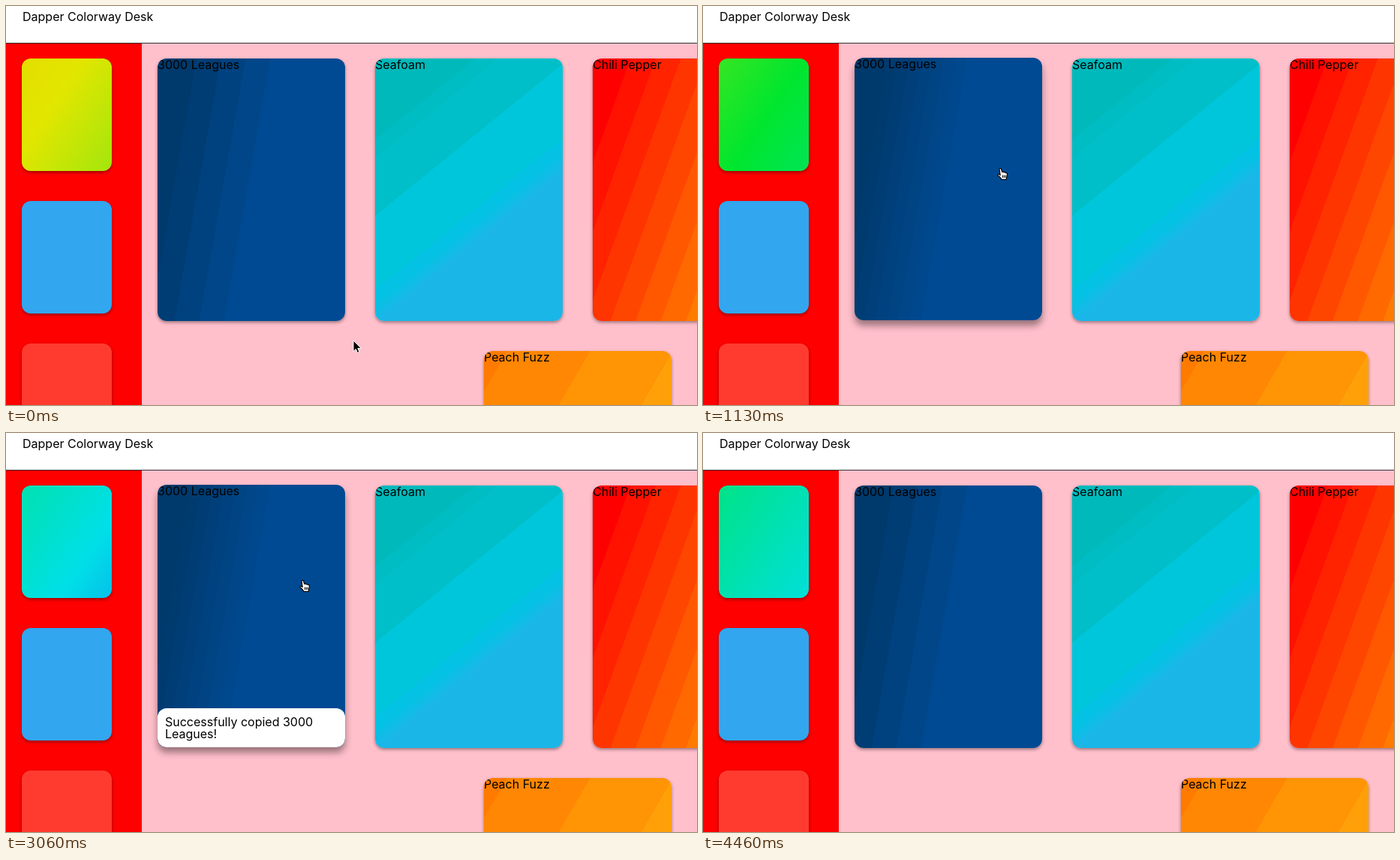
Animation of 921 by 532 pixels, one loop 4.56 s. Source, as an HTML page:

```html
<!DOCTYPE html>
<html lang="en">
<head>
<meta charset="utf-8">
<title>Dapper Colorway Desk</title>
<style>
  html, body { margin: 0; width: 100%; height: 100%; overflow: hidden; }
  body { position: relative; background: #ffbfcb; color: #000; font: 16px/1 Inter, sans-serif; }
  header { position: absolute; left: 0; top: 0; width: 100%; height: 49px; background: #fff; border-bottom: 1px solid #333; }
  header span { position: absolute; left: 22px; top: 6px; }
  aside { position: absolute; left: 0; top: 50px; width: 181px; bottom: 0; background: #f00; }
  .tile, .card { position: absolute; border-radius: 12px; box-shadow: 0 2px 4px rgba(0, 0, 0, .4); }
  .tile { left: 21px; width: 120px; height: 150px; }
  .card { width: 250px; height: 350px; overflow: hidden; }
  #rainbow {
    top: 20px;
    background: linear-gradient(124deg, #f00, #e90000, #ebb400, #e2e600, #00e62e, #00dfe8, #2a00ea, #dd00f5, #dd00f5);
    background-size: 1800% 1800%;
  }
  #toast {
    position: absolute; left: 0; bottom: 0; width: 230px; padding: 10px;
    background: #fff; border-radius: 12px;
  }
  svg { position: absolute; left: 0; top: 0; width: 20px; height: 20px; overflow: visible; }
</style>
</head>
<body>
<header><span>Dapper Colorway Desk</span></header>
<aside>
  <div class="tile" id="rainbow"></div>
  <div class="tile" style="top:210px;background:#32a6ee"></div>
  <div class="tile" style="top:400px;background:#ff3b30"></div>
</aside>
<main></main>
<svg id="arrow"><path d="M0 0V14.5L3.3 11.4L5.5 16.5L8 15.4L5.8 10.4H10.3Z" stroke="#fff"/></svg>
<svg id="hand"><g transform="translate(-4)" stroke="#000" stroke-linejoin="round">
  <path fill="#fff" stroke-width="1.2" d="M3 1.5C3.2 0 5.2 0 5.6 1.5L6.7 5.4C7.5 4.6 8.8 4.8 9.1 5.9C10 5.2 11.2 5.6 11.5 6.6C12.6 6.2 13.5 7 13.5 8.2L13 12L12 15.3H6L4.5 13L1.2 10C0 8.6 1.3 7.6 2.6 8.4L4.2 9.5Z"/>
  <path fill="none" d="M7.4 9.5v3.5M9.3 9.5v3.5M11.2 9.5v3.5"/>
</g></svg>
<script>
const LOOP = 4560;
const RAINBOW_SWEEP = 3950;
const HOVER_TIME = 400;
const byId = id => document.getElementById(id);
const clamp = v => Math.min(1, Math.max(0, v));
const mix = (a, b, k) => a + (b - a) * k;
const smooth = k => k * k * (3 - 2 * k);

// Stepped gradient: evenly spaced hard edges, colours blended between two ends.
function bands(angle, from, to, first, step, edges) {
  const stops = Array.from({ length: edges + 1 }, (_, i) => {
    const color = from.map((v, k) => Math.round(mix(v, to[k], i / edges)));
    return `rgb(${color}) 0 ${first + step * i}px`;
  });
  return `linear-gradient(${angle}deg, ${stops})`;
}

const navy = [0, 57, 107], blue = [0, 74, 147];
const red = [255, 0, 0], orange = [255, 123, 0], amber = [255, 160, 8];

// hover: times at which the pointer enters and leaves
const cards = [
  { name: '3000 Leagues', x: 202, y: 70, hover: [800, 3380],
    rest: bands(100, navy, blue, 51, 32.3, 4),
    active: bands(100, navy, blue, 43, 15, 8) },
  { name: 'Seafoam', x: 492, y: 70, hover: [3420, 3560],
    rest: `linear-gradient(141deg, #00b9bb 84px, #00bdc3 0 103px, #00bfc8 0 163px,
      #00c6db 0 240px, #04c2e3 0 254px, #1bb6e8 275px)` },
  { name: 'Chili Pepper', x: 782, y: 70,
    rest: bands(110, red, orange, 47.5, 31.5, 7) },
  { name: 'Peach Fuzz', x: 637, y: 460, hover: [3740, 3980],
    rest: bands(120, orange, amber, 27, 95.5, 3),
    active: bands(120, orange, amber, 27, 176, 2) },
];

for (const card of cards) {
  card.el = document.createElement('div');
  card.el.className = 'card';
  card.el.textContent = card.name;
  card.el.style.left = card.x + 'px';
  card.el.style.top = card.y + 'px';
  document.querySelector('main').append(card.el);
}
const toast = document.createElement('div');
toast.id = 'toast';
toast.textContent = 'Successfully copied 3000 Leagues!';
cards[0].el.append(toast);

// Where the pointer pauses or turns
const path = [
  { t: 240, x: 463, y: 446 },
  { t: 690, x: 449, y: 435 },
  { t: 950, x: 398, y: 286 },
  { t: 1210, x: 395, y: 196 },
  { t: 3230, x: 395, y: 196 },
  { t: 3860, x: 843, y: 507 },
  { t: 4060, x: 858, y: 550 },
];

function pointerAt(t) {
  const next = path.findIndex(point => point.t > t);
  if (next < 0) return path[path.length - 1];
  if (next === 0) return path[0];
  const a = path[next - 1], b = path[next];
  const k = smooth((t - a.t) / (b.t - a.t));
  return { x: mix(a.x, b.x, k), y: mix(a.y, b.y, k) };
}

// The CSS "ease" curve, cubic-bezier(.25, .1, .25, 1)
function ease(x) {
  const bezier = (u, a, b) => 3 * u * (1 - u) ** 2 * a + 3 * u * u * (1 - u) * b + u ** 3;
  let low = 0, high = 1;
  for (let i = 0; i < 24; i++) {
    const mid = (low + high) / 2;
    if (bezier(mid, .25, .25) < x) low = mid; else high = mid;
  }
  return bezier(low, .1, 1);
}

const ramp = (t, from) => ease(clamp((t - from) / HOVER_TIME));
const pulse = (t, [enter, leave]) => clamp(ramp(t, enter) - ramp(t, leave));

function draw(t) {
  const phase = t / RAINBOW_SWEEP;
  const sweep = phase < 1 ? ease(phase) : 1 - ease(phase - 1);
  byId('rainbow').style.backgroundPosition = `${100 * sweep}% ${mix(82, 19, sweep)}%`;

  for (const { el, hover, rest, active } of cards) {
    const lift = hover ? pulse(t, hover) : 0;
    const raised = lift > .01;
    el.style.background = raised && active || rest;
    el.style.transform = raised ? `translateY(${-lift}px)` : 'none';
    el.style.boxShadow = `0 ${mix(2, 7, lift)}px ${mix(4, 10, lift)}px rgba(0, 0, 0, .4)`;
  }
  toast.style.transform = `translateY(${100 - 100 * pulse(t, [1600, 3380])}%)`;

  const { x, y } = pointerAt(t);
  const overCard = cards.some(c => x >= c.x && x < c.x + 250 && y >= c.y && y < c.y + 350);
  for (const id of ['arrow', 'hand']) {
    const cursor = byId(id);
    cursor.style.transform = `translate(${Math.round(x)}px, ${Math.round(y)}px)`;
    cursor.style.visibility = (id === 'hand') === overCard ? 'visible' : 'hidden';
  }
}

let start;
function frame(now) {
  start ??= now;
  draw(Math.max(0, now - start) % LOOP);
  requestAnimationFrame(frame);
}
draw(0);
requestAnimationFrame(frame);
</script>
</body>
</html>
```
